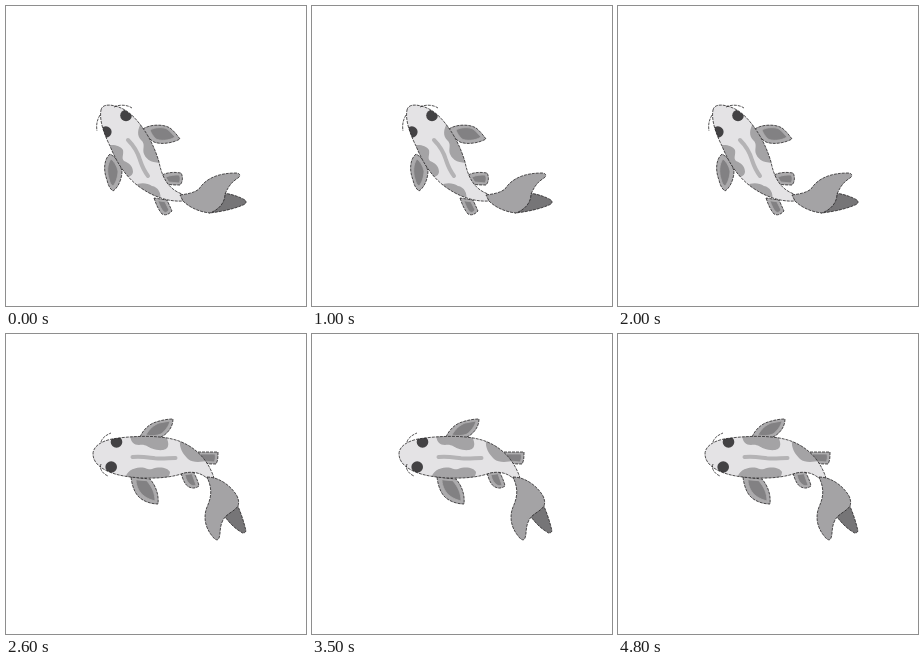
An HTML page with a canvas for the animation above (5000 ms loop, 300 by 300 pixels).

```html
<!DOCTYPE html>
<html>
<head>
<meta charset="utf-8">
<style>
html, body { margin: 0; width: 100%; height: 100%; overflow: hidden; background: #fff; }
canvas { display: block; width: 300px; height: 300px; }
</style>
</head>
<body>
<canvas id="stage"></canvas>
<script>
const LOOP = 5000;
// Times at which the fish flips between its two poses
const FLIPS = [500, 600, 700, 1000, 1500, 1600, 1700, 2000, 2100, 2200, 2300,
  2400, 2500, 3000, 3500, 3600, 3700, 3800, 3900, 4000, 4500, 4600, 4700];

const COLOR = {
  body: '#e4e3e5', patch: '#a4a3a5', stripe: '#b4b3b5', rim: '#acabad',
  fin: '#828183', dark: '#767577', eye: '#434244', line: '#1c1b1d'
};

const diagonal = {
  body: 'M95 104 C96 99 102 98 109 100 C118 102 126 108 133 117 C142 128 149 142 153 156 C156 171 162 183 176 188 L177 195 C163 196 149 191 138 184 C120 173 110 155 104 140 C98 128 93 114 95 104 Z',
  fins: [
    ['M137 123 C144 118 158 118 164 122 C168 125 171 129 174 133 C167 137 155 139 148 136 C144 134 140 129 137 123 Z',
     'M144 124 C149 121 157 121 161 123 C164 125 167 129 169 131 C163 135 154 135 150 133 C147 130 145 127 144 124 Z'],
    ['M104 148 C98 153 97 164 101 174 C102 179 104 183 107 185 C112 182 116 173 116 165 C114 158 110 151 104 148 Z',
     'M105 153 C101 158 101 167 103 173 C104 177 105 179 107 180 C110 177 112 170 112 165 C111 160 108 155 105 153 Z'],
    ['M156 169 C162 166 169 166 175 167 C177 170 177 176 174 179 C170 179 165 179 161 178 Z',
     'M160 171 C165 169 169 169 173 169 C175 172 174 175 173 177 L163 176 Z'],
    ['M148 192 C150 198 152 203 156 208 C160 210 163 208 166 205 L161 194 Z',
     'M152 195 C154 200 155 203 158 206 C160 207 161 206 163 204 L159 196 Z']
  ],
  patches: [
    'M99 140 C106 138 114 139 117 144 C118 149 115 152 118 155 C123 157 127 160 127 166 C126 171 122 171 117 172 Z',
    'M136 116 C131 123 131 130 135 134 C140 138 136 143 138 148 C141 155 147 157 158 157 Z',
    'M128 180 C134 176 141 177 146 180 C152 181 156 187 154 195 Z'
  ],
  stripe: 'M122 134 C129 141 132 147 134 154 C136 160 139 166 142 170',
  eyes: [[120, 109.5, 5.8], [99.8, 126, 5.8]],
  whiskers: 'M108 101 C114 98 122 99 126 102 M94 109 C91 114 90 119 91 125',
  tailDark: 'M217 187 C226 188 234 191 239 194 C241 196 240 198 237 199 C228 203 214 206 203 207 L208 195 Z',
  tail: 'M174 189 C181 188 188 187 193 183 C200 172 213 167 230 167 C234 167 235 170 232 172 C224 177 222 182 219 188 C219 196 214 203 204 207 C194 206 184 202 177 195 Z'
};

const level = {
  body: 'M87 120 C87 112 96 107 106 105 C124 102 150 101 166 105 C184 109 201 122 208 144 L203 146 C196 139 188 137 178 139 C160 146 130 145 113 141 C100 138 87 131 87 120 Z',
  fins: [
    ['M134 103 C137 96 143 90 150 88 C156 86 162 85 167 85 C167 92 163 98 157 102 C150 105 141 105 134 103 Z',
     'M140 101 C143 95 148 91 153 89 L164 87 C163 92 159 97 155 100 C150 102 145 102 140 101 Z'],
    ['M125 143 C126 152 129 160 134 164 C139 168 146 170 152 170 C153 161 150 152 144 145 Z',
     'M130 146 C130 153 134 159 138 162 C142 165 146 166 149 167 C149 159 146 153 141 147 Z'],
    ['M188 118 L212 118 C212 123 212 127 210 130 C204 130 199 130 195 128 Z',
     'M193 120 L209 120 C210 124 209 126 208 128 L198 127 Z'],
    ['M175 139 C177 146 179 151 183 153 C187 155 190 154 193 152 C192 147 190 143 187 137 Z',
     'M179 141 C180 146 182 149 185 151 C187 152 189 152 190 151 L186 140 Z']
  ],
  patches: [
    'M124 99 C124 107 127 111 133 111 C140 110 141 113 146 114.5 C153 117 161 117 162 112 C163 108 161 106 160 101 Z',
    'M119 146 C120 137 127 134 134 133.5 C140 133 141 136 146 135 C154 132 162 134 164 138 C164 141 162 143 161 147 Z',
    'M174 106 C173 114 177 120 182 125 C187 129 194 128 202 127 L190 112 Z'
  ],
  stripe: 'M126.5 123 C136 122 142 123.5 149 124.3 C157 125 163 124 169.5 124',
  eyes: [[110.5, 108, 5.8], [105.2, 133, 5.8]],
  whiskers: 'M95 108 C96 104 100 101 105 99 M95 130 C93 135 97 140 102 142',
  tailDark: 'M231 170 C235 179 238 188 240 197 C239 199 237 200 235 198 C228 194 223 188 219 183 Z',
  tail: 'M201 143 C214 143 226 153 231 162 C233 166 233 169 232 172 C228 178 221 179 217 186 C213 194 215 199 213 204 C212 207 209 206 207 203 C199 194 197 183 201 173 C206 162 206 154 201 143 Z'
};

const canvas = document.getElementById('stage');
const ctx = canvas.getContext('2d');
const ratio = window.devicePixelRatio || 1;
canvas.width = canvas.height = 300 * ratio;
ctx.scale(ratio, ratio);

function fill(d, color) {
  ctx.fillStyle = color;
  ctx.fill(new Path2D(d));
}

function stroke(d, color, width) {
  ctx.strokeStyle = color;
  ctx.lineWidth = width;
  ctx.stroke(new Path2D(d));
}

// Thin broken ink line
function ink(d) {
  ctx.save();
  ctx.lineCap = 'butt';
  ctx.setLineDash([3, 1]);
  stroke(d, COLOR.line, 0.75);
  ctx.restore();
}

function outlined(d, color) {
  fill(d, color);
  ink(d);
}

function drawFish(pose) {
  for (const [outer, inner] of pose.fins) {
    outlined(outer, COLOR.rim);
    fill(inner, COLOR.fin);
    stroke(inner, COLOR.rim, 0.8);
  }
  fill(pose.body, COLOR.body);

  ctx.save();
  ctx.clip(new Path2D(pose.body));
  for (const d of pose.patches) fill(d, COLOR.patch);
  ctx.fillStyle = COLOR.eye;
  for (const [x, y, r] of pose.eyes) {
    ctx.beginPath();
    ctx.arc(x, y, r, 0, Math.PI * 2);
    ctx.fill();
  }
  ctx.restore();

  stroke(pose.stripe, COLOR.stripe, 4);
  ink(pose.body);
  ink(pose.whiskers);
  outlined(pose.tailDark, COLOR.dark);
  outlined(pose.tail, COLOR.patch);
}

function render(now) {
  const t = now % LOOP;
  const flips = FLIPS.filter(at => at <= t).length;
  ctx.fillStyle = '#fff';
  ctx.fillRect(0, 0, 300, 300);
  drawFish(flips % 2 ? level : diagonal);
}

ctx.lineCap = 'round';
ctx.lineJoin = 'round';
const start = performance.now();
function tick() {
  render(performance.now() - start);
  requestAnimationFrame(tick);
}
tick();
</script>
</body>
</html>
```
